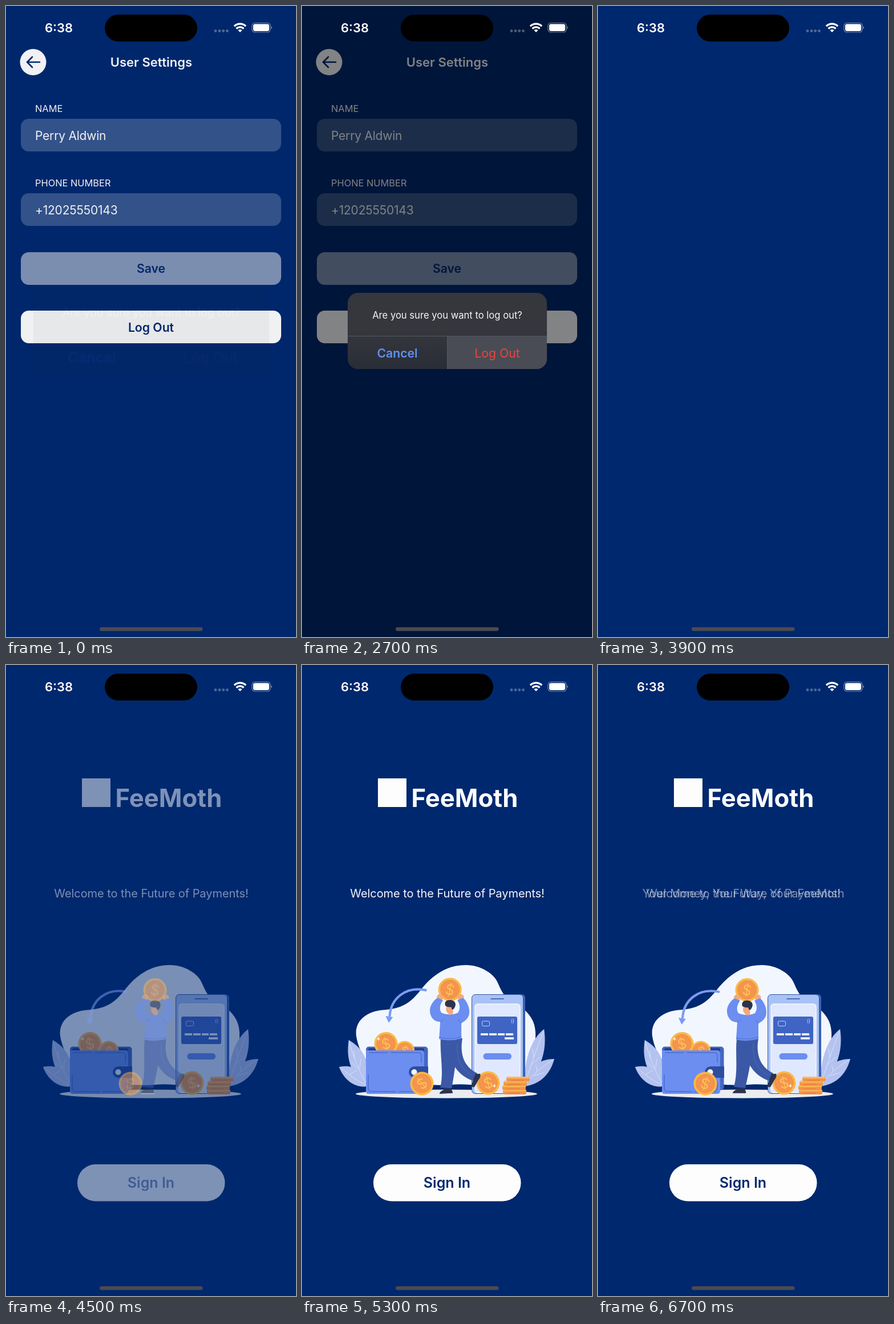
Write an HTML page that moves like this. It is 508 px wide and 1102 px high and loops after 6.8 s.

```html
<!DOCTYPE html>
<html lang="en">
<head>
<meta charset="utf-8">
<title>Log out flow</title>
<style>
html, body { margin: 0; width: 100%; height: 100%; overflow: hidden; background: #00286e; }
svg { display: block; width: 100%; height: 100%; }
text { font-family: Inter, Roboto, sans-serif; font-size: 21.2px; fill: #f5f6f8; }
.mid { text-anchor: middle; }
.semi { font-weight: 600; }
.label { font-size: 16.4px; }
.value { font-size: 21px; letter-spacing: -.01em; }
.navy { fill: #00286e; }
.pale { fill: #f5f6f8; }
.tag { font-size: 20px; letter-spacing: -.003em; }
.field { fill: #f5f6f8; fill-opacity: .21; }
.line { fill: none; stroke-linecap: round; stroke-linejoin: round; }
.leaf { fill: #b4c2ef; }
.vein { fill: none; stroke: #dbe4fb; stroke-width: .9; }
.blue { fill: #6b8ef0; }
.deep { fill: #3a58a5; }
.skin { fill: #f6a77c; }
.ink { fill: #2b3350; }
</style>
</head>
<body>
<svg viewBox="0 0 508 1102" preserveAspectRatio="none">
  <defs>
    <linearGradient id="glass" x2="0" y2="1">
      <stop stop-color="#35373c"/><stop offset=".5" stop-color="#36373d"/><stop offset="1" stop-color="#282d37"/>
    </linearGradient>
    <clipPath id="card"><rect x="80" y="501" width="349" height="133" rx="18"/></clipPath>
    <g id="coin">
      <circle r="20.5" fill="#fbb848"/>
      <circle r="16.3" fill="#f4944e"/>
      <circle r="16.3" fill="none" stroke="#e98a3f" stroke-width=".8"/>
      <text class="mid" y="9" style="font-size:25px;fill:#fdc257">$</text>
    </g>
  </defs>
  <rect width="508" height="1102" fill="#00286e"/>

  <g id="settings">
    <circle class="pale" cx="47.5" cy="98" r="23"/>
    <path class="line" d="M59 98H37M46 89L37 98L46 107" stroke="#00286e" stroke-width="2.7"/>
    <text class="mid semi" x="254.5" y="106" style="font-size:22px">User Settings</text>
    <text class="label" x="51" y="185">NAME</text>
    <rect class="field" x="26" y="197" width="456" height="57" rx="14"/>
    <text class="value" x="51" y="234">Perry Aldwin</text>
    <text class="label" x="51" y="315">PHONE NUMBER</text>
    <rect class="field" x="26" y="327" width="456" height="57" rx="14"/>
    <text class="value" x="51" y="363.5">+12025550143</text>
    <rect class="pale" x="26" y="430" width="456" height="57" rx="14" opacity=".51"/>
    <text class="mid semi navy" x="254" y="466">Save</text>
    <rect class="pale" x="26" y="532" width="456" height="57" rx="14"/>
    <text class="mid semi navy" x="254" y="568.5">Log Out</text>
  </g>
  <rect id="dim" width="508" height="1102"/>
  <g id="dialog">
    <g clip-path="url(#card)">
      <rect x="80" y="501" width="349" height="133" fill="url(#glass)"/>
      <rect id="press" x="255" y="577" width="174" height="57" fill="#494c55"/>
      <path d="M80 576.5H429M254.5 577V634" stroke="#555861"/>
    </g>
    <text class="mid" x="254.5" y="546" style="font-size:16.6px">Are you sure you want to log out?</text>
    <text class="mid semi" x="167" y="614" style="fill:#628ff0">Cancel</text>
    <text class="mid" x="342" y="614" style="fill:#e9453f">Log Out</text>
  </g>

  <!-- welcome: each layer fades on its own, so they show through one another -->
  <g class="layer">
    <rect x="133" y="198" width="50" height="50" fill="#fdfdfe"/>
    <text x="191.5" y="247.5" style="font-size:43.6px;font-weight:700;fill:#fdfdfe">FeeMoth</text>
    <text id="tagA" class="mid tag" x="254.5" y="406">Welcome to the Future of Payments!</text>
    <text id="tagB" class="mid tag" x="254.5" y="406">Your Money, Your Way, Your FeeMoth</text>
    <rect x="125" y="872" width="258.5" height="64.5" rx="32" fill="#fdfdfe"/>

    <path fill="#f2f7ff" d="M95 648C92 622 112 605 142 602.500C174 600 188 592 206 570C228 541 254 524 287 524C314 524 336 540 342 553C347 564 351 574 360 583C376 593 408 606 409 642C410 684 396 730 362 736C326 738 292 730 262 733C220 736 150 730 118 696C106 684 98 666 95 648Z"/>
    <path class="leaf" d="M114 736C88 718 76 690 82 655C102 666 114 684 114 704ZM114 736C92 739 73 724 65 702C88 697 106 708 114 724Z"/>
    <path class="vein" d="M114 734C100 710 90 684 82 656M113 734C96 726 80 714 66 702M92 686L91 674M100 706L86 694M101 704L103 688M84 715L96 708"/>
    <path class="leaf" d="M390 736C388 690 402 652 424 636C430 674 418 708 390 736ZM390 736C394 704 414 688 442 688C435 714 418 732 390 736Z"/>
    <path class="vein" d="M390 734C400 700 412 668 424 637M390 735C404 714 422 700 441 689M406 686L404 670M402 698L418 684M412 710L410 700M406 717L424 712"/>
    <ellipse cx="253" cy="749" rx="159" ry="7.5" fill="#ebecee"/>

    <!-- phone -->
    <rect x="300" y="575" width="91" height="174" rx="6" fill="#3a61b7"/>
    <rect x="297.5" y="575.5" width="90" height="173" rx="6" fill="#a8c2f5" stroke="#33559f"/>
    <rect x="303" y="592" width="79" height="155" rx="5" fill="#dfe8fe" stroke="#f5f8ff" stroke-width="1.5"/>
    <path class="line" d="M331 583H353" stroke="#33559f" stroke-width="1.6"/>
    <rect x="307" y="614" width="70" height="48" rx="3" fill="#4064c4"/>
    <rect x="315.5" y="622" width="13" height="8.5" rx="2" fill="none" stroke="#c7d6fb"/>
    <path class="line" d="M367 619q2 3 0 6M369.5 618q3 4 0 8" stroke="#c7d6fb" stroke-width=".9"/>
    <path d="M313 645H326M328 645H341M343 645H355M357 645H370M355 652H371" stroke="#fff" stroke-width="3.6"/>
    <rect class="blue" x="317.5" y="678" width="49.5" height="11" rx="5.5"/>

    <!-- wallet -->
    <rect x="112" y="666.5" width="108.5" height="76" rx="5" fill="#4467c4"/>
    <rect x="116" y="669" width="98" height="12" rx="3" fill="#263f88"/>
    <use href="#coin" transform="translate(180 674) rotate(15) scale(.85)"/>
    <use href="#coin" transform="translate(147 661.5) rotate(-12)"/>
    <path d="M134 649l1 3 3 1-3 1-1 3-1-3-3-1 3-1z" fill="#fff0c8"/>
    <path class="blue" d="M112 673H209Q214 673 214 678V744Q214 749 209 749H117Q112 749 112 744Z"/>
    <path class="line" d="M118 677H150M156 677H206Q209 677 209 682V694M209 728V740Q209 745 204 745H170M164 745H122Q116 745 116 739V716" stroke="#3a5cba"/>
    <path d="M221 701H197A10 10 0 0 0 197 721H221Z" fill="#2f4d9f"/>
    <circle cx="196.5" cy="711" r="5" fill="#f2f7ff"/>

    <g id="stack"></g>
    <use href="#coin" transform="translate(326 730) rotate(-12)"/>
    <path d="M337 731l1 3 3 1-3 1-1 3-1-3-3-1 3-1z" fill="#fff0c8"/>
  </g>

  <g id="arrow" class="layer">
    <path class="line" d="M213 571C176 563 150 585 148 617" stroke="#7c9cf2" stroke-width="4.2" style="stroke-linecap:butt"/>
    <path d="M141 616L154 618L146.5 628Z" fill="#7c9cf2"/>
  </g>
  <use id="held" class="layer" href="#coin"/>
  <g class="layer">
    <g id="legL">
      <path class="deep" d="M243 652H272C270 685 264 712 258 739L238 737C246 708 240 680 243 652Z"/>
      <path class="ink" d="M244 738L256 739Q260 745 259 748H236Q236 744 244 741Z"/>
      <path d="M236 748.5H260" stroke="#e6ebf7" stroke-width="1.4"/>
    </g>
    <path class="deep" d="M255 652H281C276 680 284 702 307 713L299 726C272 716 256 694 255 652Z"/>
    <path class="line" d="M272 662C270 690 280 708 298 716" stroke="#5672bd" stroke-width=".8"/>
    <path class="ink" d="M304 714L312 714Q314 719 309 725L302 737Q297 738 297 734L300 724Z"/>
    <g id="torso">
      <circle class="skin" cx="243.5" cy="581" r="5.5"/>
      <circle class="skin" cx="280" cy="581" r="5.5"/>
      <path class="blue" d="M239 582L249 586C243 594 242 602 246 608C254 612 268 612 275 608C280 600 278 593 274 586L284 582C293 590 297 604 294 613C291 621 283 625 281 626L281 653Q262 659 242 654L244 624C232 624 225 614 226 602C227 594 232 587 239 582Z"/>
      <path class="line" d="M244 624Q248 622 250 619M281 626Q278 624 276 620M242 651Q262 656 281 650" stroke="#4a6fd6"/>
      <path class="skin" d="M255 594L267 596L266 604Q268 612 261 612Q255 608 254 603Z"/>
      <path class="ink" d="M253 596C250 588 257 585 263 586C271 587 273 594 268 601L265 603L263 598Q258 599 253 596Z"/>
    </g>
  </g>
  <use id="roller" class="layer" href="#coin"/>
  <text class="mid semi navy layer" x="254" y="913" style="font-size:25px">Sign In</text>

  <!-- system chrome -->
  <rect x="173" y="15" width="162" height="47" rx="23.5"/>
  <text class="mid semi" x="92.5" y="46" style="font-size:22px;fill:#fff">6:38</text>
  <g fill="#fff" fill-opacity=".3">
    <circle cx="367" cy="43.5" r="2.4"/><circle cx="374" cy="43.5" r="2.4"/>
    <circle cx="380.7" cy="43.5" r="2.4"/><circle cx="387.5" cy="43.5" r="2.4"/>
  </g>
  <path d="M399.9 35.4A14.3 14.3 0 0 1 420.1 35.4M403.6 39.6A9 9 0 0 1 416.4 39.6" fill="none" stroke="#fff" stroke-width="3.2"/>
  <path d="M406.4 42.3Q410 39.6 413.6 42.3L410 46Z" fill="#fff"/>
  <rect x="431" y="29.5" width="32" height="16.5" rx="5" fill="none" stroke="#fff" stroke-opacity=".45" stroke-width="1.2"/>
  <rect x="433" y="31.5" width="28" height="12.5" rx="3.4" fill="#fff"/>
  <path d="M464.5 35Q467.5 37.7 464.5 40.5Z" fill="#fff" fill-opacity=".5"/>
  <rect x="164" y="1085" width="180.5" height="6.5" rx="3.25" fill="#4d4a4e"/>
</svg>
<script>
const LOOP = 6800, STEP = 100;
const $ = id => document.getElementById(id);
const layers = document.querySelectorAll('.layer');
const ramp = (t, a, b) => Math.min(1, Math.max(0, (t - a) / (b - a)));
const easeInOut = x => x < .5 ? 2 * x * x : 1 - 2 * (1 - x) ** 2;
const fade = (el, v) => el.setAttribute('opacity', v.toFixed(3));
const move = (id, v) => $(id).setAttribute('transform', v);

// Four coins, bottom to top, each nudged sideways
$('stack').innerHTML = [1, 0, 2, 7].map((dx, i) => {
  const x = 351 + dx, y = 741.5 - i * 7.5;
  return `<rect x="${x}" y="${y}" width="41" height="8.5" rx="3.5" fill="#f4924d"/>
    <rect x="${x}" y="${y}" width="41" height="3" rx="1.5" fill="#fcba50"/>
    <path d="M${x + 8} ${y + 6}h22" stroke="#e07c39"/>`;
}).join('');

function pose(t) {
  const shown = t < 500 ? 1 - Math.exp(-(t + 6) / 130) : 1;
  const alert = shown * (1 - ramp(t, 3025, 3275));
  const scale = 1 + .195 * (1 - shown);
  fade($('dialog'), alert);
  fade($('dim'), .47 * alert);
  fade($('press'), t >= 2700 && t < 3100 ? 1 : 0);
  move('dialog', `translate(254.5 567.5) scale(${scale}) translate(-254.5 -567.5)`);
  fade($('settings'), 1 - ramp(t, 3350, 3750));

  const welcome = ramp(t, 3900, 5100);
  layers.forEach(el => fade(el, welcome));
  const swap = ramp(t, 6500, 6900);
  fade($('tagA'), 1 - swap);
  fade($('tagB'), swap);

  const sway = (1 - Math.cos(2 * Math.PI * (t - 4500) / 2200)) / 2;
  const roll = easeInOut(ramp(t, 4500, 6700));
  const dx = -2.2 * sway, dy = -sway;
  move('arrow', `translate(${6.6 * sway} ${-3.5 * sway})`);
  move('torso', `translate(${dx} ${dy})`);
  move('held', `translate(${261 + dx} ${567.5 + dy}) rotate(10)`);
  move('legL', `rotate(${-3.6 * sway} 262 655)`);
  move('roller', `translate(${218 - 30 * roll} 731) rotate(${5 - 170 * roll})`);
}

function tick() {
  pose(Math.floor(performance.now() % LOOP / STEP) * STEP);
  requestAnimationFrame(tick);
}
tick();
</script>
</body>
</html>
```
